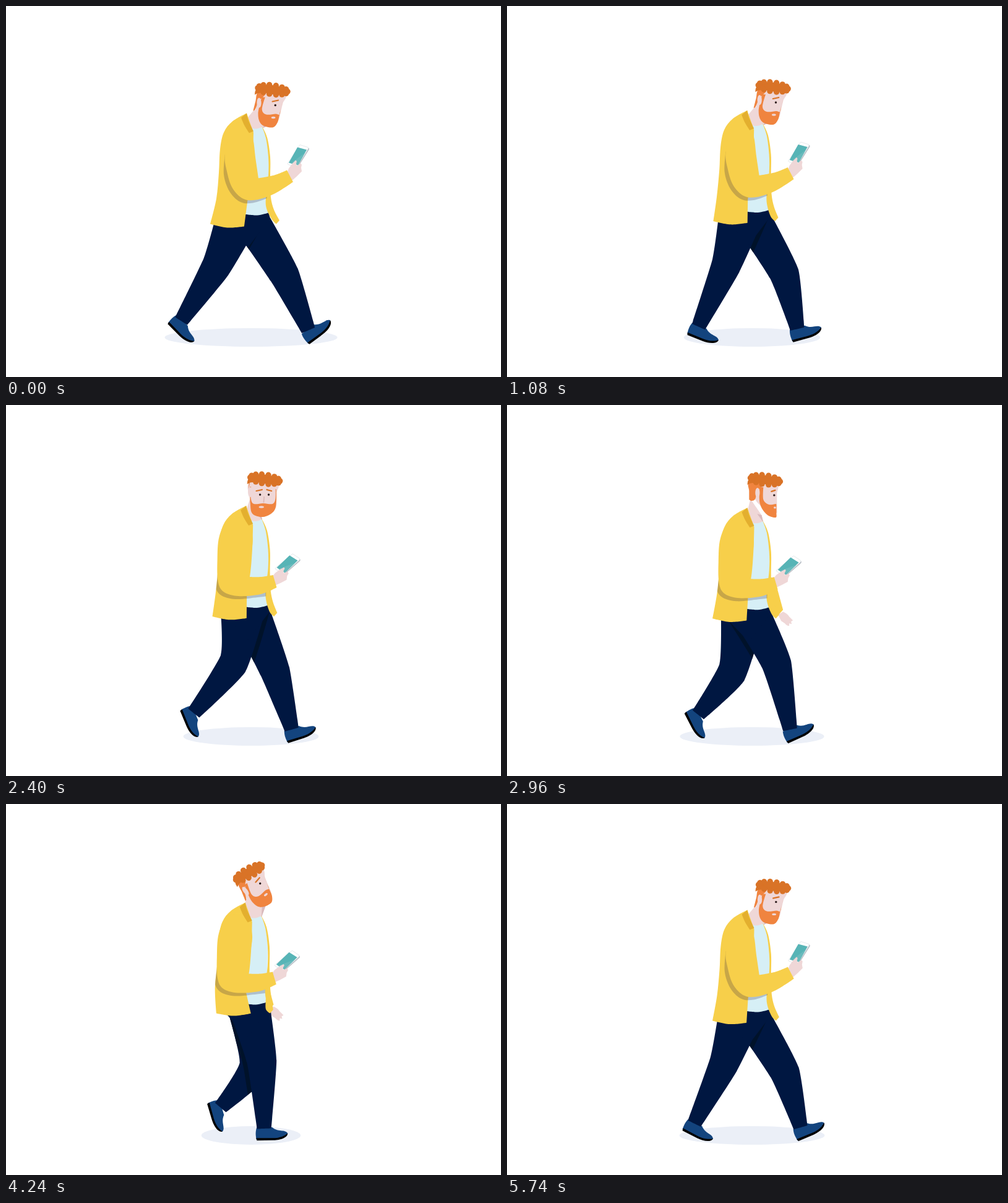
These frames come from a looping animation (800x600 px, 5.76 s). An HTML page:

```html
<!DOCTYPE html>
<html lang="en">
<head>
<meta charset="utf-8">
<title>Walking with a phone</title>
<style>
html, body { margin: 0; width: 100%; height: 100%; overflow: hidden; background: #fff; }
svg { display: block; width: 100vw; height: 100vh; }
.navy { fill: #001741; } .yellow { fill: #f7cf4a; } .gold { fill: #e3af2f; }
.skin { fill: #efd7d7; } .orange { fill: #f0843f; } .rust { fill: #d97327; }
.tee { fill: #d6eff6; } .blue { fill: #13447e; }
.brow { fill: none; stroke: #d97327; stroke-width: 2.2; stroke-linecap: round; }
</style>
</head>
<body>
<svg viewBox="0 0 800 600">
  <defs>
    <g id="shoe">
      <path class="blue" d="M-12-2C-15 7-13 13-13 17L16 18C28 17 36 14 38 8C33 1 23 7 13-2Z"/>
      <path d="M-13 15L14 15.500C26 15.500 33 12 38 8C38 15 26 19 15 19L-12 19Z"/>
    </g>
    <clipPath id="onFar"><path id="farClip"/></clipPath>
    <clipPath id="onTop"><path id="jacketClip"/><path id="teeClip"/></clipPath>
  </defs>
  <ellipse id="ground" cx="396" cy="536" ry="15" fill="#ebeff7"/>
  <g id="farArm">
    <path class="skin" d="M-13-9L-5-14Q2-11 5-6L11 0L8 2L9 6L5 5L5 9Q1 9-2 5L-8 1Z"/>
    <path class="yellow" d="M-30-48L-14-50L-5-17L-13-8Q-18-10-20-16Z"/>
  </g>
  <use id="farShoe" href="#shoe"/><path id="farLeg" class="navy"/>
  <path id="legShade" clip-path="url(#onFar)" fill="none" stroke="#00122a" stroke-width="14"/>
  <use id="nearShoe" href="#shoe"/><path id="nearLeg" class="navy"/>
  <path id="pelvis" class="navy"/>
  <path id="neck" class="skin"/><path id="neckShade" fill="#d9babd"/>
  <path id="tee" class="tee"/>
  <path id="flap" class="yellow"/>
  <path id="jacket" class="yellow"/>
  <path id="armShade" clip-path="url(#onTop)" fill="#2a2040" fill-opacity=".23"/>
  <g id="phone">
    <path d="M3-17L17-13Q19-12 17-9L0 18L-3 19Z" fill="#b9bfc6"/>
    <path d="M3-18L16-14Q17-13 16-11L-2 18L-16 14Q-18 13-16 11Z" fill="#fff" stroke="#e0e4e8" stroke-width=".8"/>
    <path d="M-1-14L14-10L0 15L-15 11Z" fill="#57b4b6"/>
    <path d="M11-5L0 15L-12 12Z" fill="#69babc"/>
    <path class="skin" d="M-15 20L-9 12L-4 7Q-1 8-3 12L-2 16L4 12L6 14L5 19L6 25L-2 33L-10 40L-18 28Z"/>
  </g>
  <path id="arm" class="yellow"/>
  <path id="collar" class="gold"/>
  <g id="head">
    <path id="face" class="skin"/>
    <path id="sideHair" class="orange"/>
    <path id="beard" class="orange"/>
    <ellipse id="ear" class="skin" rx="3.600" ry="8"/>
    <path id="nearBrow" class="brow"/><circle id="nearEye" r="1.700" fill="#2a1b1b"/>
    <ellipse id="mouth" class="skin" ry="1.700"/>
    <g id="farSide">
      <path id="farBrow" class="brow"/><circle id="farEye" r="1.700" fill="#2a1b1b"/>
      <path id="nose" fill="none" stroke="#dcb5b5" stroke-width="1.500"/>
    </g>
    <g id="hair" class="rust"></g>
  </g>
</svg>
<script>
const LOOP = 5760, STEP = 580, STRIDE = 2 * STEP;
const { PI, sin, cos, atan2, abs, min, max } = Math, RAD = PI / 180;
const el = {};
document.querySelectorAll('[id]').forEach(n => el[n.id] = n);
const set = (id, attrs) => { for (const k in attrs) el[id].setAttribute(k, attrs[k]); };

const lerp = (a, b, m) => a + (b - a) * m;
const mix = (a, b, m) => a.map((p, i) => [lerp(p[0], b[i][0], m), lerp(p[1], b[i][1], m), p[2]]);
const move = (pts, dx, dy) => pts.map(p => [p[0] + dx, p[1] + dy, p[2]]);
const poly = pts => 'M' + pts.map(p => p[0].toFixed(2) + ' ' + p[1].toFixed(2)).join('L');
const ease = (t, a, b) => {
  const u = min(1, max(0, (t - a) / (b - a)));
  return u * u * (3 - 2 * u);
};
// Periodic bump of height 1 around a phase; a higher power is narrower.
const bump = (q, centre, power) => abs(cos(PI * (q - centre))) ** power;

// Closed smooth curve; a third value gives a point's sharpness from 0 to 1.
function spline(pts) {
  const n = pts.length, at = i => pts[(i + n) % n];
  const pull = i => [0, 1].map(k => (at(i + 1)[k] - at(i - 1)[k]) / 6 * (1 - (at(i)[2] || 0)));
  let d = poly([at(0)]);
  for (let i = 0; i < n; i++) {
    const a = at(i), b = at(i + 1), u = pull(i), v = pull(i + 1);
    d += 'C' + [a[0] + u[0], a[1] + u[1], b[0] - v[0], b[1] - v[1], b[0], b[1]]
      .map(x => x.toFixed(2)).join(' ');
  }
  return d + 'Z';
}

const ARM_UP = [[366, 195], [354, 240], [357, 268], [366, 295], [383, 312], [404, 314], [434, 304],
  [464, 285, 1], [454, 266, 1], [434, 274], [408, 279, 1], [403, 245], [399, 215], [388, 190]];
const ARM_DOWN = [[360, 196], [345, 224], [342, 262], [343, 296], [352, 313], [376, 320], [412, 317],
  [438, 306, 1], [432, 286, 1], [413, 289], [393, 289, 1], [396, 256], [399, 226], [390, 196]];

// Head shapes as [angle around the head, height]; 0 degrees is the nose.
const FACE = [[-100, 4], [90, 6], [88, 20], [80, 34], [60, 46], [0, 52], [-60, 46], [-110, 28]];
const BEARD = [[-70, 10, 1], [-70, 30], [-45, 38], [0, 37], [45, 38], [70, 30], [72, 14, 1],
  [85, 14, 1], [85, 38], [50, 51], [0, 59], [-55, 54], [-85, 37], [-88, 10, 1]];
const SIDE_HAIR = [[-70, 3], [-78, 10], [-95, 16], [-105, 29], [-125, 32], [-180, 30, 1], [-180, 16], [-180, 3]];

const curls = Array.from({ length: 14 }, (_, i) => {
  const a = i / 14 * 2 * PI, x = 24 * cos(a);
  return [x, -2 + 7.5 * sin(a) + .12 * x];
});
el.hair.innerHTML = `<path d="${poly(curls)}Z"/><path d="M-29 6Q-29-5-20-8L-9 2Q-20 1-29 6Z"/>` +
  curls.map(c => `<circle cx="${c[0]}" cy="${c[1]}" r="4.700"/>`).join('');

// q: 0 as the heel lands, 0.5 as the toe pushes off.
function drawLeg(side, q, bob) {
  const far = side === 'far' ? 1 : 0, u = max(0, 2 * q - 1), planted = q < .5;
  const ax = 478 + 11 * far - 195 * (planted ? 2 * q : 1 - u + .045 * sin(2 * PI * u));
  const ay = 525 - 34 * bump(q, .66, 6);
  const turn = 75 * bump(q, .63, 6) - 37 * bump(q, 0, 30);
  const kx = 447 + 3 * far - 108 * (planted ? 2 * q : (1 - u) ** 2);
  const ky = 422 + 13 * far + .38 * bob;

  const shin = atan2(kx - ax, ay - ky), lean = atan2(394 - ax, ay - 348 - bob);
  const across = (x, y, half, a) => [-half, half].map(h => [x + h * cos(a), y + h * sin(a)]);
  const [back, front] = across(kx, ky, 24, (shin + lean) / 2);
  const [heel, instep] = across(ax, ay, 11.5, shin);
  const hipBack = min(360, 337 + (back[0] - 318) * .35);
  const hipFront = min(427, 414 + (front[0] - 360) * .2);
  const d = spline([[hipBack, 347 + bob, 1], [...back, .5], [...heel, 1],
    [...instep, 1], [...front, .5], [hipFront, 343 + bob, 1]]);
  set(side + 'Leg', { d });
  set(side + 'Shoe', { transform: `translate(${ax} ${ay}) rotate(${turn})` });
  return d;
}

function drawHead(t, dx, bob) {
  const toFront = ease(t, 1200, 1480), toAway = ease(t, 2720, 3060);
  const up = ease(t, 3600, 3960), down = ease(t, 4740, 5110);
  const follow = (...stops) => [toFront, toAway, up, down].reduce((v, m, i) => lerp(v, stops[i + 1], m), stops[0]);
  const x = follow(431, 419.5, 417.5, 396, 431) + dx;
  const y = follow(138, 133, 130, 127, 138) + bob;
  const tilt = follow(0, 0, 0, -36, 0), yaw = follow(44, 0, 88, 44, 44);
  const bow = .25 * follow(1, 0, 0, 1, 1);

  const view = (angle, h, size = 1) => {
    const a = min(90, max(-90, angle + yaw)) * RAD;
    return [-3 + 21 * size * sin(a) - bow * (h - 10), h];
  };
  const wrap = (pts, size) => pts.map(p => [...view(p[0], p[1], size), p[2]]);
  const put = (id, angle, h) => {
    const [cx, cy] = view(angle, h);
    set(id, { cx, cy });
  };

  set('head', { transform: `translate(${x} ${y}) rotate(${tilt})` });
  set('face', { d: spline(wrap(FACE, 1.04)) });
  set('beard', { d: spline(wrap(BEARD)) });
  set('sideHair', { d: spline(wrap(SIDE_HAIR, 1.1)) });
  set('nearBrow', { d: poly(wrap([[-32, 17], [-5, 15]])) });
  set('farBrow', { d: poly(wrap([[16, 15], [40, 17]])) });
  set('nose', { d: poly(wrap([[4, 26], [2, 36]])) });
  put('nearEye', -14, 23);
  put('farEye', 25, 23);
  put('ear', -97, 19);
  put('mouth', -8, 43);
  set('mouth', { rx: max(0, 4.2 * cos((yaw - 8) * RAD)) });
  set('farSide', { opacity: max(0, 1 - yaw / 28) });

  const c = cos(tilt * RAD), s = sin(tilt * RAD);
  const place = p => [x + p[0] * c - p[1] * s, y + p[0] * s + p[1] * c];
  const nape = place(view(-180, 29)), throat = place([-6, 55]);
  const base = move([[415, 198], [400, 206], [388, 184]], dx, bob);
  set('neck', { d: poly([nape, throat, ...base]) });
  set('neckShade', { d: poly([throat, [throat[0] - 7, throat[1] - 2], base[0]]) });
}

function drawTorso(open, dx, bob) {
  const tee = spline(move([[396, 198, 1], [405, 199], [414, 196, 1], [421, 212], [425, 245], [424, 290],
    [421, 318], [424, 335, 1], [406, 339], [384, 337, 1], [386, 300], [390, 240]], dx, bob));
  const tip = 432 + 10 * open, hemL = 341 - 11 * open - dx, hemR = 397 - 12 * open - dx;
  const flap = spline(move([[413, 194, 1], [422, 213], [427, 245], [427, 280], [428, 310],
    [430 + 3 * open, 330], [tip, 347, 1], [tip - 5, 353, 1], [tip - 12, 346], [421, 328],
    [420, 310], [424, 275], [424, 245], [420, 214]], dx * .5, bob));
  const jacket = spline(move([[389, 174, 1], [366, 187], [352, 205], [346, 232], [344, 270], [340, 312],
    [hemL, 353, 1], [(hemL + hemR) / 2, 357 + 2 * open], [hemR, 353 + 4 * open, 1],
    [390, 318, 1], [396, 280], [399, 240], [400, 205, 1]], dx, bob));
  set('tee', { d: tee });
  set('teeClip', { d: tee });
  set('flap', { d: flap });
  set('jacket', { d: jacket });
  set('jacketClip', { d: jacket });
  set('collar', { d: spline(move([[380, 181, 1], [389, 174, 1], [392, 186], [400, 203, 1],
    [393, 206, 1], [385, 193]], dx, bob)) });
}

function drawArm(low, dx, bob) {
  const sag = 5 * sin(PI * low);
  const arm = move(mix(ARM_UP, ARM_DOWN, low), dx, bob)
    .map((q, i) => i > 2 && i < 11 ? [q[0], q[1] + sag, q[2]] : q);
  const under = move(arm.slice(2, 7), -5, 5);
  const edge = lerp(310, 319, low) + bob + sag;
  set('arm', { d: spline(arm) });
  set('armShade', { d: spline([[arm[1][0], arm[1][1], 1], ...under, [430, edge, 1], [430, edge - 14, 1],
    [arm[5][0], arm[5][1] - 12, 1], [arm[3][0] + 8, arm[3][1] - 12, 1]]) });
  const x = lerp(472, 455.5, low) + dx, y = lerp(243, 268, low) + bob + sag;
  set('phone', { transform: `translate(${x} ${y}) rotate(${17 * low})` });
}

function draw(t) {
  const p = t % STRIDE / STRIDE, s = t % STEP / STEP;
  const rise = p < .5 ? 19 : 16;
  const bob = -rise * max(0, sin(PI * min(1, s / .92))) ** .7;
  const open = bump(s, 0, 4), dx = -2.5 * (1 - open);

  set('ground', { rx: 140 - 72 * sin(PI * s) });
  set('farArm', { transform: `translate(${418 - 35 * cos(2 * PI * p)} ${356 + bob})` });
  set('farClip', { d: drawLeg('far', p, bob) });
  set('legShade', { d: drawLeg('near', (p + .5) % 1, bob) });
  set('pelvis', { d: poly(move([[350, 330], [423, 330], [427, 344], [391, 391], [352, 350]], 0, bob)) });
  drawTorso(open, dx, bob);
  drawArm(ease(t, 1280, 1800) - ease(t, 4840, 5450), dx * .5, bob);
  drawHead(t, dx, bob);
}

const start = performance.now();
function tick() {
  draw((performance.now() - start) % LOOP);
  requestAnimationFrame(tick);
}
tick();
</script>
</body>
</html>
```
